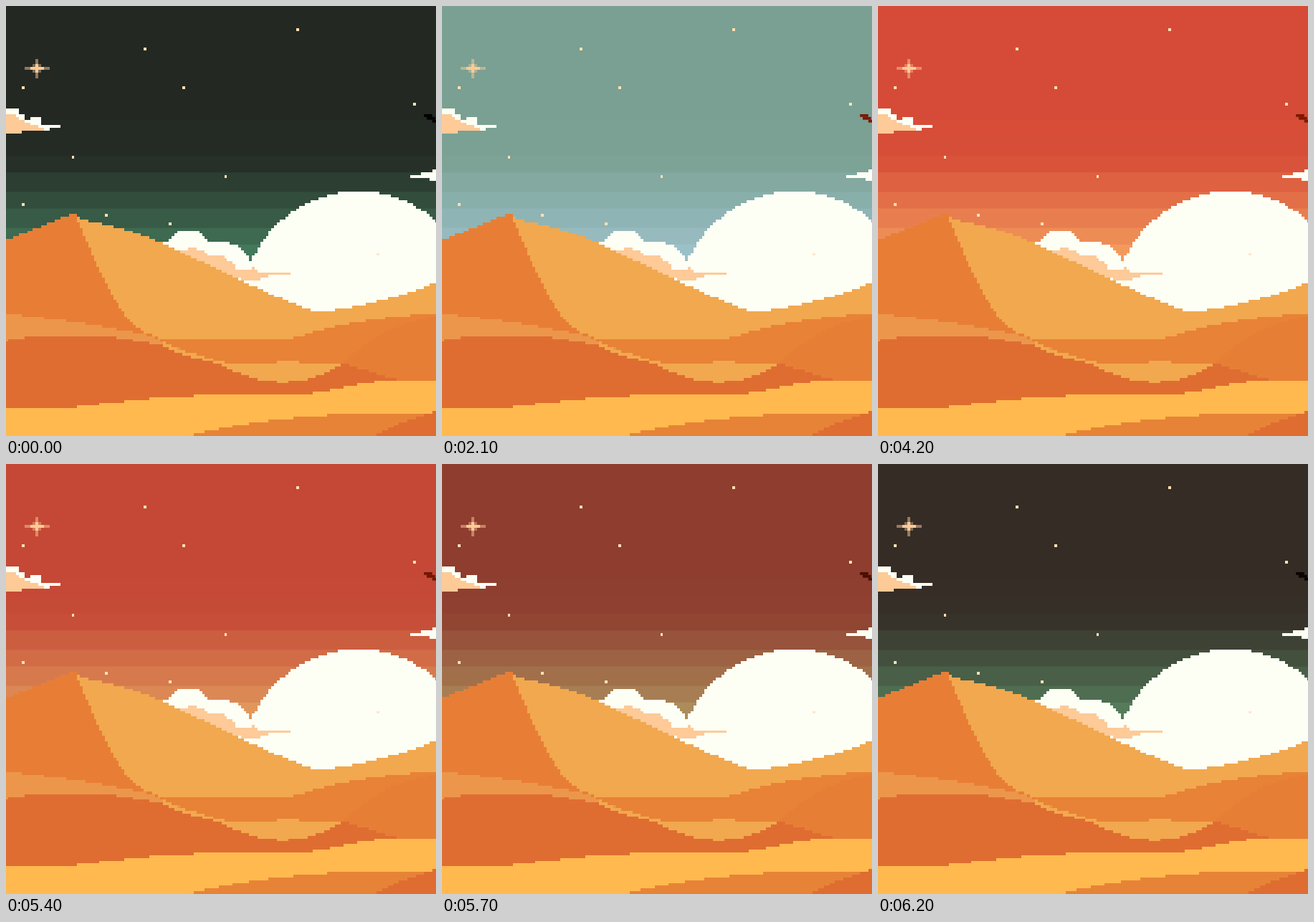
An HTML page with a canvas that plays this animation: 600x600 px, repeating every 6.3 s.

```html
<!DOCTYPE html>
<html lang="en">
<head>
<meta charset="utf-8">
<title>Desert sky</title>
<style>
  html, body { margin: 0; width: 100%; height: 100%; overflow: hidden; }
  canvas { display: block; }
</style>
</head>
<body>
<canvas id="stage" width="600" height="600"></canvas>
<script>
const COLS = 156, ROWS = 155, CELL = 600 / ROWS, SHIFT = 1.3;
const WHITE = '#fdfff5', PEACH = '#fdca98', SAND = '#f2a84e', CLAY = '#df6d31';

const stage = document.getElementById('stage').getContext('2d');
stage.setTransform(CELL, 0, 0, CELL, -SHIFT, 0);
stage.imageSmoothingEnabled = false;

const scene = document.createElement('canvas');
scene.width = COLS;
scene.height = ROWS;
const art = scene.getContext('2d');

function block(color, x, y, alpha = 1) {
  art.globalAlpha = alpha;
  art.fillStyle = color;
  art.fillRect(x, y, 1, 1);
}

// Fills every cell whose centre lies inside a path given in stage pixels.
function shape(color, d) {
  const path = new Path2D(d + 'Z');
  for (let y = 0; y < ROWS; y++)
    for (let x = 0; x < COLS; x++)
      if (art.isPointInPath(path, (x + .5) * CELL - SHIFT, (y + .5) * CELL)) block(color, x, y);
}

function drawStars() {
  const dots = [[105, 8], [50, 15], [64, 29], [6, 29], [147, 35], [24, 54], [79, 61], [6, 71], [36, 75], [59, 78]];
  for (const [x, y] of dots) block('#ffe0b4', x, y);
  block('#fde8cc', 134, 89);

  // Bright star: a cross that fades at its tips, with a faint glow
  for (let i = -4; i <= 4; i++) {
    const reach = Math.abs(i);
    if (reach < 2) for (const j of [-1, 1]) block(PEACH, 11 + i, 22 + j, .4);
    block(PEACH, 11 + i, 22, reach < 3 ? 1 : .5);
    if (reach < 4) block(PEACH, 11, 22 + i, reach < 2 ? 1 : .5);
  }
}

function drawClouds() {
  shape(WHITE, 'M-5,143H18V151H26V159H33V155H49V167H76V171H62V174H-5');
  shape(PEACH, 'M-5,155L8,150 22,159 58,174H22V178H-5');
  shape(WHITE, 'M594,228H605V244H591V240H564V236H580V232H594');
  shape(WHITE, 'M214,329H228A27,21 0 0 1 281,330Q325,322 342,357V390H214');
  shape(PEACH, 'M240,342Q270,332 282,348Q305,344 322,366L340,369 345,364 355,372H398V375H365V379H355V383H330');
  shape(WHITE, 'M-5,325H3V329H-5');
}

// Far to near
function drawDunes() {
  shape(SAND, 'M92,291L112,299 165,311Q200,322 240,341L330,384Q400,416 428,425H447Q520,418 605,384V600H92');
  shape('#e87e35', 'M-5,329L45,309 91,291H97L122,350Q148,410 175,443Q190,455 220,466V600H-5');
  shape('#e88236', 'M215,465H395Q490,434 605,429V600H300L240,480');
  shape('#e77e36', 'M468,500Q530,440 605,433V600H468');
  shape('#ec964c', 'M-5,429Q110,440 205,461L245,480V490H-5');
  shape(SAND, 'M222,470L245,480 305,498H375L385,494H405L410,499H470V540H300L215,472');
  shape(CLAY, 'M-5,468L40,460H140L215,473 250,488 300,500Q390,550 470,499L545,521H605V605H-5');
  shape('#ffb94e', 'M-5,562H75L215,546 300,542 425,541 525,522H605V605H-5');
  shape('#e78337', 'M248,601Q350,576 465,570H605V605H248');
  shape(CLAY, 'M508,602Q560,575 605,565V605');
}

const rgb = hex => hex.match(/../g).map(c => parseInt(c, 16));
const blend = (a, b, t) => a.map((v, k) => v + (b[k] - v) * t);
const css = color => `rgb(${color.map(Math.round)})`;

// Colours at the top of the sky, at the horizon, and of the bird
const skies = [
  ['232823', '43785a', '000000'],
  ['79a092', '9cc0c8', '7a1808'],
  ['d64b37', 'f29a5c', '7d1802']
].map(sky => sky.map(rgb));

const HOLD = 1200, PHASE = 2100, STEP = 100, BANDS = 9;

function draw(now) {
  const time = now % (PHASE * skies.length);
  const phase = Math.floor(time / PHASE), local = time % PHASE;
  const mix = local < HOLD ? 0 : (Math.floor((local - HOLD) / STEP) + 1) * STEP / (PHASE - HOLD + STEP);
  const next = skies[(phase + 1) % skies.length];
  const [top, horizon, bird] = skies[phase].map((color, i) => blend(color, next[i], mix));

  for (let i = 0; i < BANDS; i++) {
    const depth = Math.max(.02 * i, .18 * i - .44);
    const y = i ? Math.floor(35.3 + 6.4 * i) : 0;
    stage.fillStyle = css(blend(top, horizon, depth));
    stage.fillRect(0, y, COLS, ROWS - y);
  }
  stage.drawImage(scene, 0, 0);
  stage.fillStyle = css(bird);
  for (let i = 0; i < 3; i++) stage.fillRect(Math.floor(151 + 1.5 * i), 39 + i, 3, 1);
}

shape(WHITE, 'M328,423a164,164 0 1 1 328,0a164,164 0 1 1 -328,0');
drawStars();
drawClouds();
drawDunes();

const start = performance.now();
function tick() {
  draw(performance.now() - start);
  requestAnimationFrame(tick);
}
tick();
</script>
</body>
</html>
```
